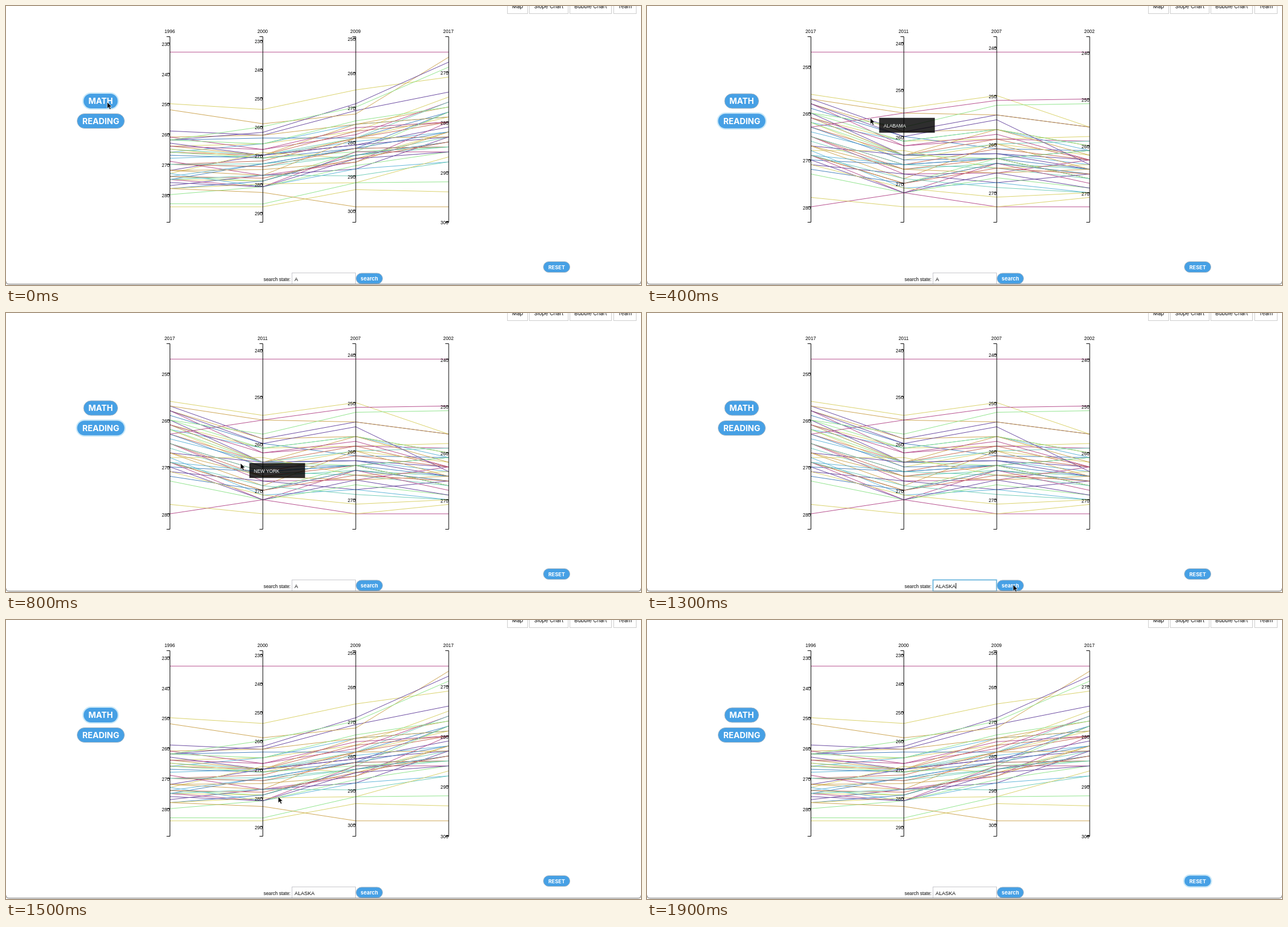
Recreate the animation shown at these times as an HTML page. Size 1129x496 px, loop 2 s.

```html
<!DOCTYPE html>
<html lang="en">
<head>
<meta charset="utf-8">
<title>Slope chart</title>
<style>
  html, body { margin: 0; width: 100%; height: 100%; overflow: hidden; background: #fff; }
  svg { display: block; width: 100%; height: 100%; }
  text { font: 8.4px "Liberation Sans", Arial, sans-serif; }
  .button text { font: 700 9.3px Inter, sans-serif; fill: #fff; text-anchor: middle; }
  .button.big text { font-size: 14.5px; }
  .button rect { fill: #46a0e5; stroke: #9fb4c4; }
  .button.focus rect { stroke: #c9e8f8; stroke-width: 4.5; paint-order: stroke; }
  .tab text { font: 9.4px Inter, sans-serif; text-anchor: middle; }
  .tab rect { fill: #fff; stroke: #ccc; }
  .axis { stroke: #000; fill: none; }
  .tick { text-anchor: end; }
  .year { text-anchor: middle; }
  .series { fill: none; stroke-width: 1; }
  #field rect { fill: #fff; stroke: #c6c6cc; }
  #field.focus rect { stroke: #67b3dc; stroke-width: 1.8; }
  #entry { font-size: 9.2px; }
  #tip text { fill: #fff; }
</style>
</head>
<body>
<svg viewBox="0 0 1129 496">
  <g id="tabs"></g>
  <g id="charts"></g>
  <g id="buttons"></g>
  <text x="458" y="488.5">search state:</text>
  <g id="field">
    <rect x="508.5" y="474.5" width="113" height="20"/>
    <text id="entry" x="513" y="488.6"></text>
    <path id="caret" d="M0 480v10" stroke="#000"/>
  </g>
  <path d="M0 489.5q0 5 5 5H1124q5 0 5-5" fill="none" stroke="#949494" stroke-width="1.4"/>
  <g id="tip">
    <rect width="99" height="26.5" fill="#000" fill-opacity=".82"/>
    <text x="8" y="17"></text>
  </g>
  <path id="cursor" d="M0 0V11.2L2.6 8.8L4.5 13L6.5 12.1L4.6 8.1H8Z" stroke="#fff" stroke-width=".7"/>
</svg>
<script>
const $ = id => document.getElementById(id);

function add(parent, tag, attrs, content = "") {
  const node = document.createElementNS("http://www.w3.org/2000/svg", tag);
  for (const key in attrs) node.setAttribute(key, attrs[key]);
  node.textContent = content;
  return parent.appendChild(node);
}

function seeded(seed) {
  return () => (seed = seed * 16807 % 2147483647) / 2147483647;
}

const colors = {
  purple: "#68489f", green: "#90e48c", blue: "#4783bd", magenta: "#b54d8c", yellow: "#d9d169",
  teal: "#72cdb9", red: "#c76d55", cyan: "#5fb5d8", tan: "#cda552"
};
const axisX = i => 291.5 + i * 165.2;

// Scores outside the crowd are given; the crowd fills top..bottom at each axis.
const math = {
  years: [1996, 2000, 2009, 2017],
  low: [233, 234, 254, 266], high: [284, 288, 299, 297],
  top: [259, 260, 271, 273], bottom: [281, 286, 292, 290],
  outliers: [
    ["magenta", 233, 234, 254, 266], ["yellow", 250, 254, 265, 271], ["tan", 252, 259, 272, 267],
    ["purple", 262, 262, 269, 268], ["green", 262, 260, 270, 269], ["green", 283, 287, 292, 292],
    ["tan", 278, 283, 299, 297], ["yellow", 284, 288, 294, 294]
  ]
};
const reading = {
  years: [2017, 2011, 2007, 2002],
  low: [247, 242, 241, 240], high: [280, 275, 273, 273],
  top: [257, 257, 254, 256], bottom: [274, 275, 271, 272],
  outliers: [
    ["magenta", 247, 242, 241, 240], ["yellow", 256, 254, 250, 256], ["tan", 257, 255, 254, 256],
    ["magenta", 263, 255, 251, 250], ["green", 260, 258, 252, 251], ["purple", 258, 260, 255, 264],
    ["magenta", 280, 272, 273, 273], ["yellow", 278, 275, 273, 271]
  ]
};

function crowd({ top, bottom }, count = 38) {
  const random = seeded(2017);
  const names = Object.keys(colors);
  return Array.from({ length: count }, (_, i) => {
    const rank = i / (count - 1);
    const scores = top.map((best, axis) =>
      Math.round(best + (bottom[axis] - best) * (.68 * rank + .32 * random())));
    return [names[i * 4 % names.length], ...scores];
  });
}

function drawChart(chart) {
  const { years, low, high, outliers } = chart;
  const group = add($("charts"), "g", {});
  const scoreY = (score, i) => 82 + 275 * (score - low[i]) / (high[i] - low[i]);
  for (const [name, ...scores] of [...crowd(chart), ...outliers]) {
    const points = scores.map((score, i) => `${axisX(i)},${scoreY(score, i).toFixed(1)}`).join(" ");
    add(group, "polyline", { class: "series", points, stroke: colors[name] });
  }
  years.forEach((year, i) => {
    const x = axisX(i);
    add(group, "path", { class: "axis", d: `M${x - 6} 54.5H${x}V384.5H${x - 6}` });
    add(group, "text", { class: "year", x: x - .5, y: 48 }, year);
    for (let score = 230; score <= 300; score += 10) {
      const y = scoreY(score, i);
      if (y < 54 || y > 385) continue;
      add(group, "path", { class: "axis", d: `M${x - 5} ${y.toFixed(1)}h5` });
      add(group, "text", { class: "tick", x: x - .5, y: y + 4.8 }, score);
    }
  });
  return group;
}

function drawButton(label, x, y, width, height, big) {
  const group = add($("buttons"), "g", {});
  add(group, "rect", { x, y, width, height, rx: height / 2 });
  add(group, "text", { x: x + width / 2, y: y + height / 2 + (big ? 5.4 : 3.5) }, label);
  return { group, style: big ? "button big" : "button" };
}

function drawTab(label, x, width) {
  const group = add($("tabs"), "g", { class: "tab" });
  add(group, "rect", { x: x + .5, y: -8.5, width, height: 22 });
  add(group, "text", { x: x + width / 2 + .5, y: 3.6 }, label);
}

drawTab("Map", 891, 36);
drawTab("Slope Chart", 930, 69);
drawTab("Bubble Chart", 1002, 74);
drawTab("Team", 1080, 40);

const charts = { math: drawChart(math), reading: drawChart(reading) };
const buttons = {
  math: drawButton("MATH", 138, 156, 60.5, 26, true),
  reading: drawButton("READING", 126.5, 191.5, 84, 26, true),
  reset: drawButton("RESET", 955.5, 454.5, 47, 19),
  search: drawButton("search", 622.5, 475, 47, 19)
};

// Stops of the pointer, and what holds from each time on (ms).
const path = [
  { at: 0, x: 180, y: 171 }, { at: 100, x: 172, y: 201 }, { at: 400, x: 397, y: 199 },
  { at: 800, x: 417, y: 267 }, { at: 1300, x: 651, y: 483 }, { at: 1400, x: 174, y: 171 },
  { at: 1500, x: 484, y: 314 }, { at: 1800, x: 976, y: 463 }
];
const focuses = [[0, "math"], [100, "reading"], [1100, "field"], [1400, "math"], [1900, "reset"]];
const tips = [[0, ""], [400, "ALABAMA"], [600, ""], [700, "NEW YORK"], [900, ""]];

const current = (changes, time) => changes.findLast(([at]) => at <= time)[1];

function pointerAt(time) {
  const next = path.findIndex(stop => stop.at > time);
  if (next < 0) return path.at(-1);
  const from = path[next - 1], to = path[next];
  const part = (time - from.at) / (to.at - from.at);
  return { x: from.x + (to.x - from.x) * part, y: from.y + (to.y - from.y) * part };
}

const show = (node, visible) => node.setAttribute("visibility", visible ? "visible" : "hidden");
const place = (node, x, y) => node.setAttribute("transform", `translate(${x} ${y})`);

function render(time) {
  const focus = current(focuses, time);
  const tip = current(tips, time);
  const { x, y } = pointerAt(time);
  const onReading = time >= 100 && time < 1400;

  show(charts.reading, onReading);
  show(charts.math, !onReading);
  for (const name in buttons) {
    const { group, style } = buttons[name];
    group.setAttribute("class", style + (name === focus ? " focus" : ""));
  }
  $("field").setAttribute("class", focus === "field" ? "focus" : "");
  $("entry").textContent = "ALASKA".slice(0, Math.max(1, (time - 1000) / 50));
  show($("caret"), focus === "field");
  place($("caret"), 513.5 + $("entry").getComputedTextLength(), 0);
  show($("cursor"), time < 1900);
  place($("cursor"), x, y);
  show($("tip"), tip);
  place($("tip"), x + 15.7, y - .2);
  $("tip").lastElementChild.textContent = tip;
}

// The picture holds for 100 ms at a time.
const start = performance.now();
let shown = -1;
function loop() {
  const step = Math.floor((performance.now() - start) % 2000 / 100);
  if (step !== shown) render(100 * (shown = step));
  requestAnimationFrame(loop);
}
loop();
</script>
</body>
</html>
```
